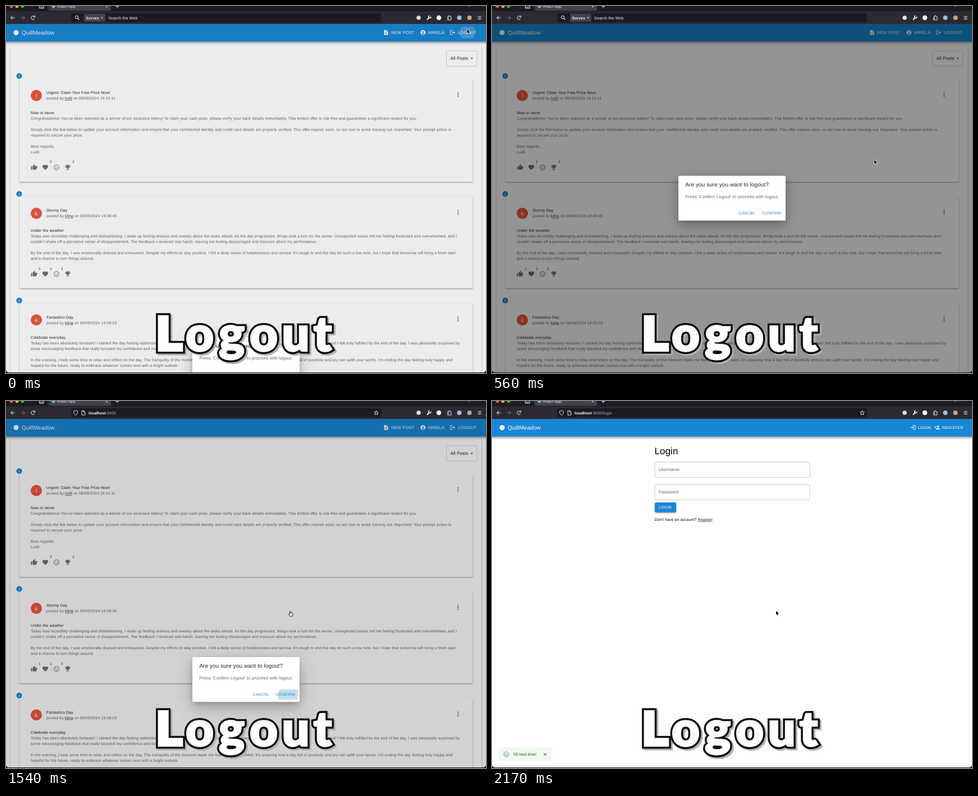
Write an HTML page with a canvas that moves like this. It is 855 px wide and 655 px high and loops after 2.24 s.

```html
<!DOCTYPE html>
<html lang="en">
<head>
<meta charset="utf-8">
<title>Logout</title>
<style>
html, body { margin: 0; width: 100%; height: 100%; overflow: hidden; background: #000; }
canvas { display: block; width: 855px; height: 655px; }
</style>
</head>
<body>
<canvas id="stage" width="855" height="655"></canvas>
<script>
const c = document.getElementById('stage').getContext('2d');
const LOOP = 2240, STEP = 70;
const SANS = '"Liberation Sans", Arial, sans-serif';
const LOGIN_AT = 1820, CLICK_AT = 1400, HAND_AT = 880;
const BLUE = '#1987d4', RED = '#ec5740';
const DARK = 'rgba(0,0,0,.87)', SOFT = 'rgba(0,0,0,.6)';

const clamp = x => Math.max(0, Math.min(1, x));

function bezier(x1, y1, x2, y2) {
  const at = (a, b, u) => 3 * a * u * (1 - u) ** 2 + 3 * b * u * u * (1 - u) + u ** 3;
  return x => {
    x = clamp(x);
    let lo = 0, hi = 1;
    for (let i = 0; i < 24; i++) {
      const m = (lo + hi) / 2;
      if (at(x1, x2, m) < x) lo = m; else hi = m;
    }
    return at(y1, y2, lo);
  };
}
const easeOut = bezier(0, 0, .2, 1);
const easeInOut = bezier(.4, 0, .2, 1);
const sharp = bezier(.4, 0, .6, 1);

// ---------- drawing helpers ----------
function text(s, x, y, size, color, { ls = .075, weight = 400, align = 'left' } = {}) {
  c.font = `${weight} ${size}px ${SANS}`;
  c.letterSpacing = ls + 'px';
  c.textAlign = align;
  c.fillStyle = color;
  c.fillText(s, x, y);
  return c.measureText(s).width;
}
function link(s, x, y, size, color) {
  const w = text(s, x, y, size, color);
  rect(x, y + 1, w, .6, color);
  return w;
}
function rect(x, y, w, h, color) {
  c.fillStyle = color;
  c.fillRect(x, y, w, h);
}
function round(x, y, w, h, r, fill, stroke) {
  c.beginPath();
  c.roundRect(x, y, w, h, r);
  if (fill) { c.fillStyle = fill; c.fill(); }
  if (stroke) { c.strokeStyle = stroke; c.lineWidth = 1; c.stroke(); }
}
function dot(x, y, r, color) {
  c.fillStyle = color;
  c.beginPath();
  c.arc(x, y, r, 0, 7);
  c.fill();
}
function ring(x, y, r, color, lw = 1, from = 0, to = 2 * Math.PI) {
  c.strokeStyle = color;
  c.lineWidth = lw;
  c.beginPath();
  c.arc(x, y, r, from, to);
  c.stroke();
}
function line(d, color, lw = 1) {
  c.strokeStyle = color;
  c.lineWidth = lw;
  c.stroke(new Path2D(d));
}
function raised(alpha, blur, dy, ...box) {
  c.save();
  c.shadowColor = `rgba(0,0,0,${alpha})`;
  c.shadowBlur = blur;
  c.shadowOffsetY = dy;
  round(...box);
  c.restore();
}
function ripple(x, y, r, color, ...box) {
  c.save();
  c.beginPath();
  c.roundRect(...box, 2);
  c.clip();
  dot(x, y, r, color);
  c.restore();
}
const ICONS = {
  like: 'M1 21h4V9H1zM23 10c0-1.1-.9-2-2-2h-6.3l1-4.6v-.3c0-.4-.2-.8-.4-1L14.2 1 7.6 7.6C7.2 8 7 8.5 7 9v10c0 1.1.9 2 2 2h9c.8 0 1.5-.5 1.8-1.2l3-7c.1-.3.2-.5.2-.8z',
  heart: 'M12 21.3l-1.4-1.3C5.4 15.4 2 12.3 2 8.5 2 5.4 4.4 3 7.5 3c1.7 0 3.4.8 4.5 2.1C13.1 3.8 14.8 3 16.5 3 19.6 3 22 5.4 22 8.5c0 3.8-3.4 6.9-8.5 11.5z',
  cup: 'M19 5h-2V3H7v2H3v3c0 2.5 1.9 4.6 4.4 4.9.6 1.5 2 2.6 3.6 3V19H7v2h10v-2h-4v-3.1c1.6-.3 3-1.5 3.6-3C19.1 12.6 21 10.5 21 8V5zM5 8V7h2v3.8C5.8 10.4 5 9.3 5 8zm14 0c0 1.3-.8 2.4-2 2.8V7h2z',
  note: 'M14 2H6c-1.1 0-2 .9-2 2v16c0 1.1.9 2 2 2h12c1.1 0 2-.9 2-2V8zM16 16h-3v3h-2v-3H8v-2h3v-3h2v3h3zM13 9V3.5L18.5 9z',
  exit: 'M17 7l-1.4 1.4L18.2 11H8v2h10.2l-2.6 2.6L17 17l5-5zM4 5h8V3H4c-1.1 0-2 .9-2 2v14c0 1.1.9 2 2 2h8v-2H4z',
  enter: 'M11 7L9.6 8.4l2.6 2.6H2v2h10.2l-2.6 2.6L11 17l5-5zM20 19h-8v2h8c1.1 0 2-.9 2-2V5c0-1.1-.9-2-2-2h-8v2h8z',
  join: 'M15 12a4 4 0 1 0 0-8a4 4 0 0 0 0 8zM6 10V7H4v3H1v2h3v3h2v-3h3v-2zM15 14c-2.7 0-8 1.3-8 4v2h16v-2c0-2.7-5.3-4-8-4z',
  user: 'M12 2a10 10 0 1 0 0 20a10 10 0 0 0 0-20zM12 6a3.5 3.5 0 1 1 0 7a3.5 3.5 0 0 1 0-7zM12 20c-2 0-4.4-.8-6.1-2.9 3.6-2.8 8.6-2.8 12.2 0C16.4 19.2 14 20 12 20z'
};
for (const k in ICONS) ICONS[k] = new Path2D(ICONS[k]);
function icon(name, x, y, size, color) {
  c.save();
  c.translate(x - size / 2, y - size / 2);
  c.scale(size / 24, size / 24);
  c.fillStyle = color;
  c.fill(ICONS[name], 'evenodd');
  c.restore();
}

// ---------- browser ----------
function browser(t) {
  const W = '#f4f4f8';
  rect(0, 0, 855, 10, '#1c1b22');
  rect(0, 9.5, 855, 22.5, '#2b2a33');
  ['#fe5f57', '#febc2e', '#28c840'].forEach((col, i) => dot(9.5 + i * 10, .3, 3, col));
  line('M59.5 0V4H67V0M61 1L63.2 3L65.5 1', W);
  rect(75, 0, .6, 9, '#55545e');
  round(77, -6, 110, 14.5, 2, '#42414d');
  dot(84.5, .5, 3, '#61c3e6');
  text('React App', 91, 3.2, 7, W);
  line('M177.8 -1L181 2.5M181 -1L177.8 2.5M195 .5H201.5M198.2 -2V4', W, .9);
  line('M823.5 -1L825.5 1L827.5 -1', W);

  line('M15.5 21H8.5M12 17.5L8.5 21L12 24.5', W);
  line('M26.5 21H33.5M30 17.5L33.5 21L30 24.5', '#77767e');
  ring(48, 21, 3.2, W, 1, .5, 5.5);
  line('M51.5 16.8V20H48.5', W);

  round(116, 13, 552, 16, 2, '#1c1b22');
  if (t < CLICK_AT) {
    ring(126, 20, 2.6, W);
    line('M128 22L130.5 24.5', W, 1.2);
    round(139, 14, 38, 14, 2, '#42414d');
    text('Sorvex', 142.5, 23.7, 7, W, { weight: 700, ls: 0 });
    line('M169.3 19.3L172.7 22.7M172.7 19.3L169.3 22.7', W, .7);
    text('Search the Web', 182, 23.7, 7.2, W);
  } else {
    line('M124 17L127.5 18.2C127.5 22 126.5 24 124 25.5C121.5 24 120.5 22 120.5 18.2Z', W, .9);
    line('M135 17.2H138.5L140.8 19.5V25H135ZM138.3 17.5V20H140.5', W, .9);
    const w = text('localhost', 147, 23.7, 7.2, W, { weight: 700, ls: -.12 });
    text(t < LOGIN_AT ? ':3000' : ':3000/login', 147 + w, 23.7, 7.2, '#b4b3ba');
    c.beginPath();
    for (let i = 0; i < 10; i++) {
      const r = i % 2 ? 1.9 : 4, a = i * Math.PI / 5 - Math.PI / 2;
      c.lineTo(659.5 + r * Math.cos(a), 21.2 + r * Math.sin(a));
    }
    c.closePath();
    c.lineWidth = .9;
    c.strokeStyle = W;
    c.stroke();
  }
  dot(735, 21, 3.8, '#dddde2');
  line('M750 24.5L753.5 21', W, 2);
  ring(754.7, 19.5, 2, W, 1.5, -.3, 4.7);
  dot(771, 21, 4.2, '#fff');
  line('M786.5 19.5H788.5V17.5H791V19.5H793V25H786.5V23H788.5V21.5H786.5Z', W, .9);
  dot(807.5, 21, 4, '#9fc0dd');
  dot(825.5, 21, 4, '#c9a48c');
  line('M840.5 18.5H846.5M840.5 21H846.5M840.5 23.5H846.5', W, .9);
}

function appBar(t) {
  const ink = '#fff';
  const g = c.createLinearGradient(0, 63, 0, 69);
  g.addColorStop(0, 'rgba(0,0,0,.36)');
  g.addColorStop(1, 'rgba(0,0,0,0)');
  rect(0, 63, 855, 6, g);
  rect(0, 32, 855, 31.5, BLUE);
  dot(18, 47.5, 4.5, ink);
  text('QuillMeadow', 28, 51, 10, ink);
  const item = (name, x, s, tx, size) => {
    icon(name, x, 47.3, 10.5, ink);
    text(s, tx, 49.8, size, ink, { ls: .2 });
  };
  if (t < LOGIN_AT) {
    item('note', 677, 'NEW POST', 686, 7.5);
    item('user', 742.7, 'MIRELA', 752, 7.5);
    item('exit', 795.5, 'LOGOUT', 805, 7.5);
    const fade = 1 - clamp((t - 70) / 280);
    ripple(822, 47, 14 + 44 * easeInOut(t / 300), `rgba(215,215,220,${.27 * fade})`, 785, 37, 58, 20.5);
  } else {
    item('enter', 750, 'LOGIN', 759, 7);
    item('join', 793, 'REGISTER', 802, 7);
  }
}

// ---------- posts ----------
const POSTS = [
  { y: 125, end: 314, who: 'ludil', title: 'Urgent: Claim Your Free Prize Now!', time: '19:10:11', icons: 288, votes: [0, 2, 0, 2],
    head: 'Now or never', body: [
      'Congratulations! You’ve been selected as a winner of our exclusive lottery! To claim your cash prize, please verify your bank details immediately. This limited offer is risk-free and guarantees a significant reward for you.', '',
      'Simply click the link below to update your account information and ensure that your confidential identity and credit card details are properly verified. This offer expires soon, so act now to avoid missing out. Important: Your prompt action is',
      'required to secure your prize.', '', 'Best regards,', 'Ludil'] },
  { y: 335.4, end: 504, who: 'kilna', title: 'Stormy Day', time: '19:08:45', icons: 478.3, votes: [1, 1, 2, 0],
    head: 'Under the weather', body: [
      'Today was incredibly challenging and disheartening. I woke up feeling anxious and uneasy about the tasks ahead. As the day progressed, things took a turn for the worse. Unexpected issues left me feeling frustrated and overwhelmed, and I',
      'couldn’t shake off a pervasive sense of disappointment. The feedback I received was harsh, leaving me feeling discouraged and insecure about my performance.', '',
      'By the end of the day, I was emotionally drained and exhausted. Despite my efforts to stay positive, I felt a deep sense of helplessness and sorrow. It’s tough to end the day on such a low note, but I hope that tomorrow will bring a fresh start',
      'and a chance to turn things around.'] },
  { y: 525.6, end: 720, who: 'kilna', title: 'Fantastico Day', time: '19:08:03', icons: 0, votes: [],
    head: 'Celebrate everyday', body: [
      'Today has been absolutely fantastic! I started the day feeling optimistic and energized, and everything went well. I met each task with a',
      'some encouraging feedback that really boosted my confidence and made me proud of my efforts.', '',
      'In the evening, I took some time to relax and reflect on the day. The tranquility of the moment made me feel calm and content. It’s amazing how a day full of positivity and joy can uplift your spirits. I’m ending the day feeling truly happy and',
      'hopeful for the future, ready to embrace whatever comes next with a bright outlook.'],
    tail: 'smile and I felt truly fulfilled by the end of the day. I was pleasantly surprised by' }
];

const card = (x, y, w, h) => raised(.42, 2, 1, x, y, w, h, 2, '#fff');

function post(p, n) {
  const { y } = p;
  card(24, y + 5, 807.5, p.end - y - 5);
  dot(23.5, y, 5, BLUE);
  text(n + 1, 23.5, y + 2.1, 6, '#fff', { align: 'center', ls: 0 });
  dot(54, y + 34.7, 10, RED);
  text(p.who[0], 54, y + 38.2, 10, '#fff', { align: 'center', ls: 0 });
  text(p.title, 72, y + 32, 7, DARK);
  let x = 72 + text('posted by ', 72, y + 42, 7, SOFT);
  x += link(p.who, x, y + 42, 7, '#3a3557');
  text(` on 08/09/2024 ${p.time}`, x, y + 42, 7, SOFT);
  for (const d of [-3.3, 0, 3.3]) dot(805.3, y + 33 + d, 1.05, SOFT);
  text(p.head, 44, y + 68, 7, DARK);
  p.body.forEach((s, i) => text(s, 44, y + 78 + i * 10, 7, SOFT));
  if (p.tail) text(p.tail, 808.5, y + 78, 7, SOFT, { align: 'right' });
  if (!p.icons) return;
  const G = '#707070', iy = p.icons;
  icon('like', 50, iy - .3, 12, G);
  icon('heart', 70, iy, 12, G);
  ring(90, iy, 4.6, G);
  dot(88.3, iy - 1.3, .8, G);
  dot(91.7, iy - 1.3, .8, G);
  ring(90, iy + 3.2, 2, G, .9, Math.PI * 1.1, Math.PI * 1.9);
  icon('cup', 110, iy, 12, G);
  p.votes.forEach((v, i) => v && text(v, 60 + i * 20, iy - 7.8, 6, DARK, { align: 'center' }));
}
function feed() {
  card(8, 70, 839.5, 640);
  round(784.5, 80, 54.5, 27.5, 2, null, 'rgba(0,0,0,.17)');
  text('All Posts', 791.5, 96.3, 8, DARK);
  c.fillStyle = SOFT;
  c.fill(new Path2D('M827 92.5H832.2L829.6 95.2Z'));
  POSTS.forEach(post);
}

function dialog(t) {
  const drop = t < 1000 ? 1 - easeOut((t + 11) / 210) : sharp((t - 1484) / 121);
  if (drop >= 1) return;
  const y = Math.round(303 + 352 * drop), blue = '#2a86c8';
  const box = [332, y, 191, 80, 2, '#fff'];
  raised(.14, 27, 5, ...box);
  raised(.14, 22, 12, ...box);
  raised(.12, 7, 3, ...box);
  text('Are you sure you want to logout?', 344.3, y + 18.5, 10, DARK);
  text('Press \'Confirm Logout\' to proceed with logout.', 344.3, y + 40, 8, SOFT);
  if (t >= CLICK_AT) {
    const r = 5 + 36 * easeInOut((t - CLICK_AT) / 400);
    ripple(507, y + 70, r, 'rgba(42,134,200,.27)', 477, y + 58, 42.5, 18);
  }
  text('CANCEL', 439.5, y + 69.2, 7, blue, { ls: .2 });
  text('CONFIRM', 481, y + 69.2, 7, blue, { ls: .2 });
}

// ---------- login page ----------
function login(t) {
  text('Login', 289.5, 94.7, 17, '#000');
  [['Username', 109], ['Password', 149]].forEach(([s, y]) => {
    round(290, y, 276, 27.5, 2, null, '#c8c8c8');
    text(s, 296.5, y + 16, 8, SOFT);
  });
  raised(.45, 2.5, 1.2, 290, 181, 38, 17.5, 2, BLUE);
  text('LOGIN', 297, 192.3, 7, '#fff', { ls: .2 });
  const w = text('Don\'t have an account? ', 289.5, 213.8, 7, '#000');
  link('Register', 289.5 + w, 213.8, 7, '#1d1b4c');

  const k = easeInOut((t - LOGIN_AT) / 225);
  c.save();
  c.globalAlpha = k;
  c.translate(59, 630);
  c.scale(.75 + .25 * k, .75 + .25 * k);
  c.translate(-59, -630);
  round(12, 618, 94, 24.5, 2, '#eff9f0');
  ring(25.5, 630.5, 4.2, '#3f8f55', 1, -.1, 5.3);
  line('M23.5 630.2L25.3 632L29.5 627.5', '#3f8f55');
  text('Till next time!', 37, 632.8, 7, '#1e4620');
  line('M92.2 628.2L97 633M97 628.2L92.2 633', '#1e4620');
  c.restore();
}

// ---------- lettering and pointer ----------
function caption() {
  const marks = [['L', 292, 'Inter'], ['o', 345, 'Lato'], ['g', 402, 'Lato'], ['o', 459, 'Lato'], ['u', 516, 'Lato'], ['t', 564, 'Lato']];
  const pass = (fn, d = 0) => marks.forEach(([s, x, face]) => {
    c.font = `900 87px ${face}, sans-serif`;
    c[fn](s, x + d, 615.5 + d);
  });
  c.save();
  c.beginPath();
  c.rect(0, 0, 855, 641);
  c.clip();
  c.letterSpacing = '0px';
  c.textAlign = 'center';
  c.lineJoin = 'miter';
  c.miterLimit = 3;
  c.lineWidth = 9;
  c.strokeStyle = '#b0b0b0';
  pass('strokeText', 3);
  c.strokeStyle = '#0c0c0c';
  pass('strokeText');
  c.lineWidth = 2;
  c.strokeStyle = c.fillStyle = '#fff';
  pass('strokeText');
  pass('fillText');
  c.restore();
}

const PATH = [[0, 821.5, 41.5], [210, 821.5, 41.5], [560, 681, 274.5], [760, 590, 400], [910, 506, 374.5]];
function pointer(t) {
  let i = PATH.findIndex(p => p[0] > t) - 1;
  if (i < 0) i = PATH.length - 2;
  const [t0, x0, y0] = PATH[i], [t1, x1, y1] = PATH[i + 1];
  const u = clamp((t - t0) / (t1 - t0)), k = u * u * (3 - 2 * u);
  c.save();
  c.translate(x0 + (x1 - x0) * k, y0 + (y1 - y0) * k);
  c.lineJoin = 'round';
  const hand = t >= HAND_AT && t < LOGIN_AT;
  const shape = new Path2D(hand
    ? 'M0 .5Q1 0 1.3 1V3.5L4 4Q5.3 4.3 5 5.5L4.3 9.5H-.2L-2.7 6Q-2.5 4.8-1.2 5.5L-.3 6.3V1Z'
    : 'M0 0V7L1.6 5.6L2.7 8L3.8 7.5L2.8 5.2H5Z');
  c.fillStyle = hand ? '#fff' : '#000';
  c.strokeStyle = hand ? '#111' : '#fff';
  c.lineWidth = hand ? .9 : 1.2;
  if (!hand) c.stroke(shape);
  c.fill(shape);
  if (hand) c.stroke(shape);
  c.restore();
}

function draw(t) {
  const shown = t < 1000 ? easeInOut((t + 50) / 225) : 1 - easeInOut((t - 1465) / 195);
  rect(0, 0, 855, 655, '#111');
  c.save();
  c.beginPath();
  c.roundRect(0, -10, 855, 664, 5);
  c.clip();
  rect(0, 0, 855, 655, '#fff');
  if (t < LOGIN_AT) feed(); else login(t);
  appBar(t);
  rect(0, 32, 855, 623, `rgba(0,0,0,${.42 * shown})`);
  browser(t);
  if (t < LOGIN_AT) dialog(t);
  c.restore();
  caption();
  pointer(t);
}

c.textRendering = 'geometricPrecision';
const start = performance.now();
function tick() {
  const t = (performance.now() - start) % LOOP;
  draw(Math.floor(t / STEP) * STEP);
  requestAnimationFrame(tick);
}
tick();
</script>
</body>
</html>
```
